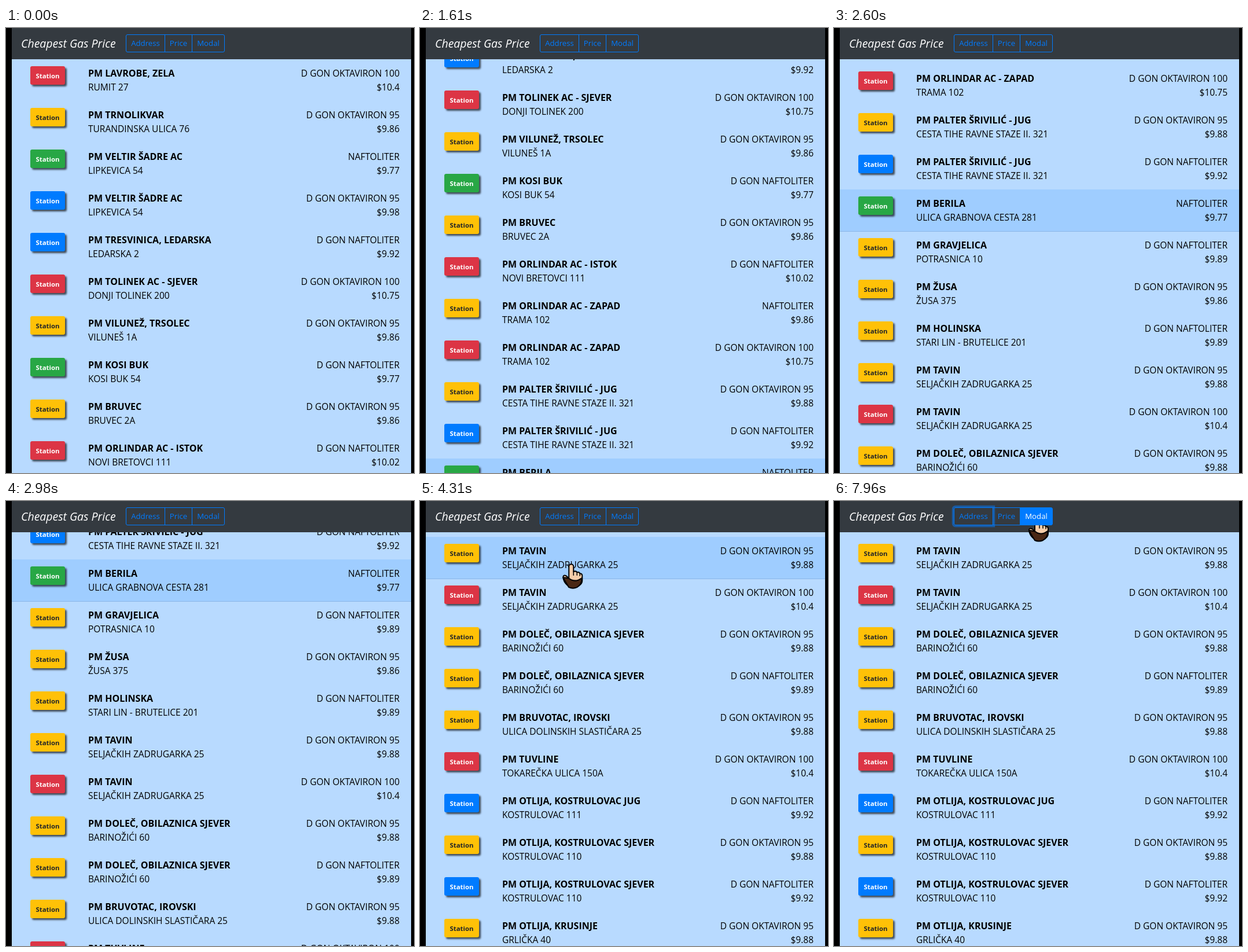
Write an HTML page that moves like this. It is 705x769 px and loops after 8 s.

```html
<!DOCTYPE html>
<html lang="hr">
<head>
<meta charset="utf-8">
<title>Cheapest Gas Price</title>
<style>
  html, body { margin: 0; width: 100%; height: 100%; overflow: hidden; background: #000; }
  .stage { position: fixed; left: 0; top: 0; width: 705px; height: 769px; overflow: hidden; font: 15.5px/24px "Open Sans", sans-serif; color: #000; white-space: nowrap; }
  header { position: absolute; left: 10px; top: 0; width: 690px; height: 54px; background: #343a40; }
  h1 { position: absolute; left: 16px; top: 0; margin: 0; font: italic 400 19.5px/54px "Open Sans", sans-serif; color: #fff; }
  .tab { position: absolute; top: 11px; height: 31px; box-sizing: border-box; border: 1px solid #007bff; font-size: 13.2px; line-height: 29px; text-align: center; color: #007bff; }
  .tab:nth-of-type(1) { left: 197px; width: 68px; border-radius: 3px 0 0 3px; }
  .tab:nth-of-type(2) { left: 264px; width: 48px; }
  .tab:nth-of-type(3) { left: 311px; width: 57px; border-radius: 0 3px 3px 0; }
  .tab.hover { background: #007bff; color: #fff; z-index: 1; }
  .tab.focus { box-shadow: 0 0 0 3.2px rgba(0, 123, 255, .5); z-index: 2; }
  main { position: absolute; left: 10px; top: 54px; width: 690px; height: 715px; overflow: hidden; background: #b8daff; }
  .list { position: absolute; left: 0; top: 0; width: 100%; }
  .row { position: relative; height: 72px; }
  .row.hover { background: #9fcdff; box-shadow: 0 1px 0 #8ab6e8; z-index: 1; }
  .row div { position: absolute; top: 12px; }
  .row .place { left: 132px; }
  .row .fuel { right: 20px; text-align: right; }
  b { font-size: 16px; }
  .row .badge { left: 32px; width: 60px; height: 32px; border-radius: 3.2px; font-size: 11.4px; font-weight: 700; line-height: 33px; text-align: center; color: #fff; box-shadow: 3px 3px 3px rgba(0, 0, 0, .65); }
  .green { background: #28a745; }
  .blue { background: #007bff; }
  .red { background: #dc3545; }
  .row .yellow { background: #ffc107; color: #212529; }
  svg { position: absolute; left: 0; top: 0; }
</style>
</head>
<body>
<div class="stage">
  <main><div class="list"></div><div class="list"></div></main>
  <header>
    <h1>Cheapest Gas Price</h1>
    <div class="tab">Address</div>
    <div class="tab">Price</div>
    <div class="tab">Modal</div>
  </header>
  <svg width="705" height="769">
    <g id="cursor" stroke="#000" stroke-width="2" stroke-linejoin="round" stroke-linecap="round">
      <path fill="#f6cda9" d="M-4 5a4 4 0 0 1 8 0V14q4-2 6 1q4-1 5 2q4 0 4 4v8q0 5-4 8H-7q-6-5-7-13q0-5 5-3l5 4z"/>
      <path fill="none" stroke-width="1.5" d="M4 14v6M10 15v5M15 17v4"/>
      <path fill="#4a2814" d="M-14 24Q-5 24 0 28Q9 32 18 25Q19 36 10 41Q3 44-4 41Q-8 35-14 24z"/>
    </g>
    <circle id="ripple" fill="#ffd21e" fill-opacity=".6"/>
  </svg>
</div>
<script>
const LOOP = 8000, ROW = 72, TOP = 54;

// name, address, then fuel + price pairs
const FUELS = {
  h: 'D GON OKTAVIRON 100',
  n: 'D GON OKTAVIRON 95',
  d: 'D GON NAFTOLITER',
  e: 'NAFTOLITER'
};
const STATIONS = `
LAVROBE, ZELA|RUMIT 27|h10.4
TRNOLIKVAR|TURANDINSKA ULICA 76|n9.86
VELTIR ŠADRE AC|LIPKEVICA 54|e9.77|n9.98
TRESVINICA, LEDARSKA|LEDARSKA 2|d9.92
TOLINEK AC - SJEVER|DONJI TOLINEK 200|h10.75
VILUNEŽ, TRSOLEC|VILUNEŠ 1A|n9.86
KOSI BUK|KOSI BUK 54|d9.77
BRUVEC|BRUVEC 2A|n9.86
ORLINDAR AC - ISTOK|NOVI BRETOVCI 111|d10.02
ORLINDAR AC - ZAPAD|TRAMA 102|e9.86|h10.75
PALTER ŠRIVILIĆ - JUG|CESTA TIHE RAVNE STAZE II. 321|n9.88|d9.92
BERILA|ULICA GRABNOVA CESTA 281|e9.77
GRAVJELICA|POTRASNICA 10|d9.89
ŽUSA|ŽUSA 375|n9.86
HOLINSKA|STARI LIN - BRUTELICE 201|d9.89
TAVIN|SELJAČKIH ZADRUGARKA 25|n9.88|h10.4
DOLEČ, OBILAZNICA SJEVER|BARINOŽIĆI 60|n9.88|d9.89
BRUVOTAC, IROVSKI|ULICA DOLINSKIH SLASTIČARA 25|n9.88
TUVLINE|TOKAREČKA ULICA 150A|h10.4
OTLIJA, KOSTRULOVAC JUG|KOSTRULOVAC 111|d9.92
OTLIJA, KOSTRULOVAC SJEVER|KOSTRULOVAC 110|n9.88|d9.92
OTLIJA, KRUSINJE|GRLIČKA 40|n9.88
TIVAK VOŠTANICA|ROKE DRUSTELIĆA 153|e9.77|n9.86|d9.89
PODLINSKI GRUD, GLINODARSKA|ULICA GLINODARSKA CESTA 2A|e9.77|n9.86|d9.89
LAVREN, AVENIJA GUTRAVA|GUTRAVA 62|e9.77|n9.86|d9.89
ZUVRIN|ZUVRIN 8|n9.86`.trim().split('\n');

const offers = STATIONS.flatMap(line => {
  const [name, address, ...fuels] = line.split('|');
  return fuels.map(f => ({ name, address, fuel: FUELS[f[0]], price: +f.slice(1) }));
});

const tint = p => p < 9.8 ? 'green' : p < 9.9 ? 'yellow' : p < 10 ? 'blue' : 'red';
const rowHtml = o => `<div class="row"><div class="badge ${tint(o.price)}">Station</div>
  <div class="place"><b>PM ${o.name}</b><br>${o.address}</div>
  <div class="fuel">${o.fuel}<br>$${o.price}</div></div>`;

const [byAddress, byPrice] = document.querySelectorAll('.list');
byAddress.innerHTML = offers.map(rowHtml).join('');
byPrice.innerHTML = [...offers].sort((a, b) => a.price - b.price).map(rowHtml).join('');
const rows = [...byAddress.children];
const tabs = [...document.querySelectorAll('.tab')];
const TAB_EDGES = [207, 274, 321, 378];
const cursor = document.getElementById('cursor');
const ripple = document.getElementById('ripple');

// scroll offset by tick, pointer position by time
const TICK = 46.8, SCROLL_START = 954;
const SCROLL = [[-1, 0], [14, 318], [26, 582], [43, 961], [53, 1123], [62, 1288]];
const POINTER = [[4220, 262, 111], [5020, 242, 32], [5060, 242, 32], [5300, 290, 32], [5870, 290, 32],
  [6250, 238, 32], [6710, 238, 32], [7400, 356, 28], [7640, 356, 28], [7780, 366, 28], [7960, 351, 27]];
const PRICE_CLICK = 5380, ADDRESS_CLICK = 6380, MODAL_CLICK = 7900;

const linear = u => u;
const smooth = u => u * u * (3 - 2 * u);

function along(keys, t, ease) {
  const i = keys.findIndex(k => k[0] > t);
  if (i === 0) return keys[0].slice(1);
  if (i < 0) return keys[keys.length - 1].slice(1);
  const a = keys[i - 1], b = keys[i];
  const u = ease((t - a[0]) / (b[0] - a[0]));
  return a.slice(1).map((v, j) => v + (b[j + 1] - v) * u);
}

function draw(t) {
  const scroll = Math.round(along(SCROLL, Math.floor((t - SCROLL_START) / TICK), linear)[0]);
  const [x, y] = along(POINTER, t, smooth);
  const shown = t >= POINTER[0][0];
  const sorted = t >= PRICE_CLICK && t < ADDRESS_CLICK;

  byAddress.style.display = sorted ? 'none' : '';
  byPrice.style.display = sorted ? '' : 'none';
  byAddress.style.transform = byPrice.style.transform = `translateY(${-scroll}px)`;

  const hovered = !shown ? 14 : y > TOP ? Math.floor((y - TOP + scroll) / ROW) : -1;
  rows.forEach((row, i) => row.classList.toggle('hover', i === hovered));

  const focused = t < PRICE_CLICK ? -1 : sorted ? 1 : 0;
  tabs.forEach((tab, i) => {
    const over = shown && y < 42 && x >= TAB_EDGES[i] && x < TAB_EDGES[i + 1];
    tab.classList.toggle('hover', over);
    tab.classList.toggle('focus', i === focused);
  });

  cursor.style.display = shown ? '' : 'none';
  cursor.setAttribute('transform', `translate(${x} ${y})`);

  const click = [PRICE_CLICK, ADDRESS_CLICK, MODAL_CLICK].find(c => t >= c && t < c + 250);
  ripple.setAttribute('cx', x - 1);
  ripple.setAttribute('cy', y - 3);
  ripple.setAttribute('r', click ? 11 * Math.min(1, (t - click) / 60) : 0);
}

function frame() {
  draw(performance.now() % LOOP);
  requestAnimationFrame(frame);
}
frame();
</script>
</body>
</html>
```
